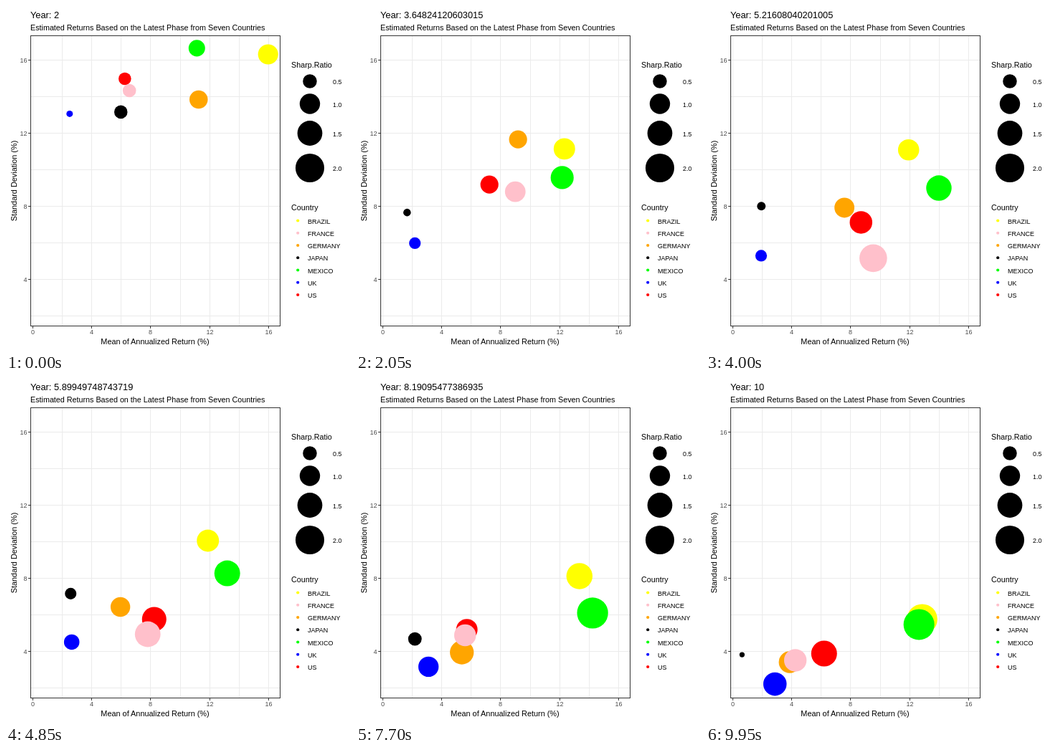
Animation of 480 by 480 pixels, one loop 10000 ms. Source, as an HTML page:

```html
<!DOCTYPE html>
<html lang="en">
<head>
<meta charset="utf-8">
<title>Returns by country</title>
<style>
  html, body { margin: 0; width: 100%; height: 100%; overflow: hidden; background: #fff; }
  svg { display: block; width: 480px; height: 480px; font-family: "Liberation Sans", Arial, sans-serif; }
</style>
</head>
<body>
<svg id="chart" viewBox="0 0 480 480"></svg>
<script>
const FRAMES = 200, STEP = 50;
const chart = document.getElementById('chart');

function add(tag, attrs, text = '') {
  const el = document.createElementNS('http://www.w3.org/2000/svg', tag);
  for (const key in attrs) el.setAttribute(key, attrs[key]);
  el.textContent = text;
  return chart.appendChild(el);
}
const label = (x, y, size, text, attrs = {}) => add('text', { x, y, 'font-size': size, ...attrs }, text);
const line = (x1, y1, x2, y2, stroke) => add('line', { x1, y1, x2, y2, stroke });
const dot = (cx, cy, r, fill) => add('circle', { cx, cy, r, fill });
const snap = v => Math.round(v) + 0.5;

const xScale = mean => 36.7 + mean * 20.59;
const yScale = sd => 483.2 - sd * 25.5;
const radius = ratio => 2 + 13.3 * Math.sqrt(Math.max(0, ratio - 0.158));

// Key poses as mean return and standard deviation, in percent
const KEY_STEPS = [0, 41, 62, 97, 119, 154, 199];
const countries = [
  country('BRAZIL', '#ffff00', [15.98, 12.34, 12.07, 11.9, 11.9, 13.36, 12.87], [16.3, 11.13, 11.65, 10.05, 8.56, 8.11, 5.75]),
  country('FRANCE', '#ffc0cb', [6.58, 9.01, 10.64, 7.82, 6.51, 5.61, 4.27], [14.32, 8.79, 6.46, 4.93, 6.71, 4.87, 3.5]),
  country('GERMANY', '#ffa500', [11.27, 9.2, 9.06, 5.97, 4.74, 5.39, 3.89], [13.83, 11.65, 9.89, 6.42, 6.11, 3.93, 3.4]),
  country('JAPAN', '#000000', [6, 1.68, 1.34, 2.6, 2.45, 2.21, 0.66], [13.15, 7.65, 8.28, 7.15, 5.38, 4.67, 3.81]),
  country('MEXICO', '#00ff00', [11.15, 12.19, 14.16, 13.21, 12.55, 14.25, 12.65], [16.64, 9.56, 9.38, 8.26, 6.6, 6.09, 5.46]),
  country('UK', '#0000ff', [2.53, 2.21, 1.41, 2.67, 2.72, 3.13, 2.89], [13.05, 5.97, 5.87, 4.5, 3.4, 3.15, 2.2]),
  country('US', '#ff0000', [6.27, 7.26, 8.45, 8.26, 6.51, 5.73, 6.22], [14.97, 9.18, 8.65, 5.75, 5.56, 5.18, 3.87]),
];

function country(name, color, mean, sd) {
  return { name, color, mean: curve(KEY_STEPS, mean), sd: curve(KEY_STEPS, sd) };
}

// Smooth curve through the keys: cubic Hermite with parabolic tangents
function curve(times, values) {
  const last = times.length - 1;
  const span = i => times[i + 1] - times[i];
  const slope = i => (values[i + 1] - values[i]) / span(i);
  const tangent = i =>
    i === 0 ? 2 * slope(0) - tangent(1) :
    i === last ? 2 * slope(last - 1) - tangent(last - 1) :
    (slope(i - 1) * span(i) + slope(i) * span(i - 1)) / (span(i - 1) + span(i));
  return t => {
    const i = Math.max(0, times.findIndex(time => time >= t) - 1);
    const p = (t - times[i]) / span(i), q = 1 - p;
    return values[i] * q * q * (1 + 2 * p) + values[i + 1] * p * p * (1 + 2 * q)
      + span(i) * p * q * (tangent(i) * q - tangent(i + 1) * p);
  };
}

// Grid
for (let v = 0; v <= 16; v += 2) {
  const x = snap(xScale(v)), y = snap(yScale(v));
  line(x, 42, x, 446, '#ebebeb');
  if (v) line(35, y, 382, y, '#ebebeb');
}

// Bubbles, in stacking order
for (const name of ['GERMANY', 'US', 'FRANCE', 'BRAZIL', 'JAPAN', 'MEXICO', 'UK']) {
  const c = countries.find(c => c.name === name);
  c.bubble = dot(0, 0, 0, c.color);
}

// Frame, ticks and axis titles
add('rect', { x: 34.5, y: 41.5, width: 348, height: 405, fill: 'none', stroke: '#333' });
for (let v = 0; v <= 16; v += 4) {
  const x = snap(xScale(v)), y = snap(yScale(v));
  line(x, 447, x, 450, '#333');
  label(x, 458, 9, v, { fill: '#4d4d4d', 'text-anchor': 'middle' });
  if (!v) continue;
  line(31, y, 34, y, '#333');
  label(29.5, y + 3.5, 9, v, { fill: '#4d4d4d', 'text-anchor': 'end' });
}
label(208, 472, 10.9, 'Mean of Annualized Return (%)', { 'text-anchor': 'middle' });
label(0, 0, 10.9, 'Standard Deviation (%)', { 'text-anchor': 'middle', transform: 'translate(15 244) rotate(-90)' });

const title = label(34, 17, 12.8, '');
label(34, 34, 10.75, 'Estimated Returns Based on the Latest Phase from Seven Countries');

// Legends
label(398, 86, 10.75, 'Sharp.Ratio');
[105, 136.5, 177.5, 226].forEach((y, n) => {
  const ratio = (n + 1) / 2;
  dot(424, y, radius(ratio), '#000');
  label(456, Math.round(y + 4), 9, ratio.toFixed(1));
});
label(398, 285, 10.75, 'Country');
countries.forEach((c, n) => {
  const y = 299.5 + n * 17.25;
  dot(407.2, y, 2.1, c.color);
  label(421, Math.round(y + 4), 9, c.name);
});

function draw(now) {
  const step = Math.floor(now / STEP) % FRAMES;
  title.textContent = 'Year: ' + +(2 + 8 * step / (FRAMES - 1)).toPrecision(15);
  for (const { bubble, mean, sd } of countries) {
    const m = mean(step), s = sd(step);
    bubble.setAttribute('cx', xScale(m));
    bubble.setAttribute('cy', yScale(s));
    bubble.setAttribute('r', radius(m / s));
  }
}

const start = performance.now();
function tick() {
  draw(performance.now() - start);
  requestAnimationFrame(tick);
}
tick();
</script>
</body>
</html>
```
